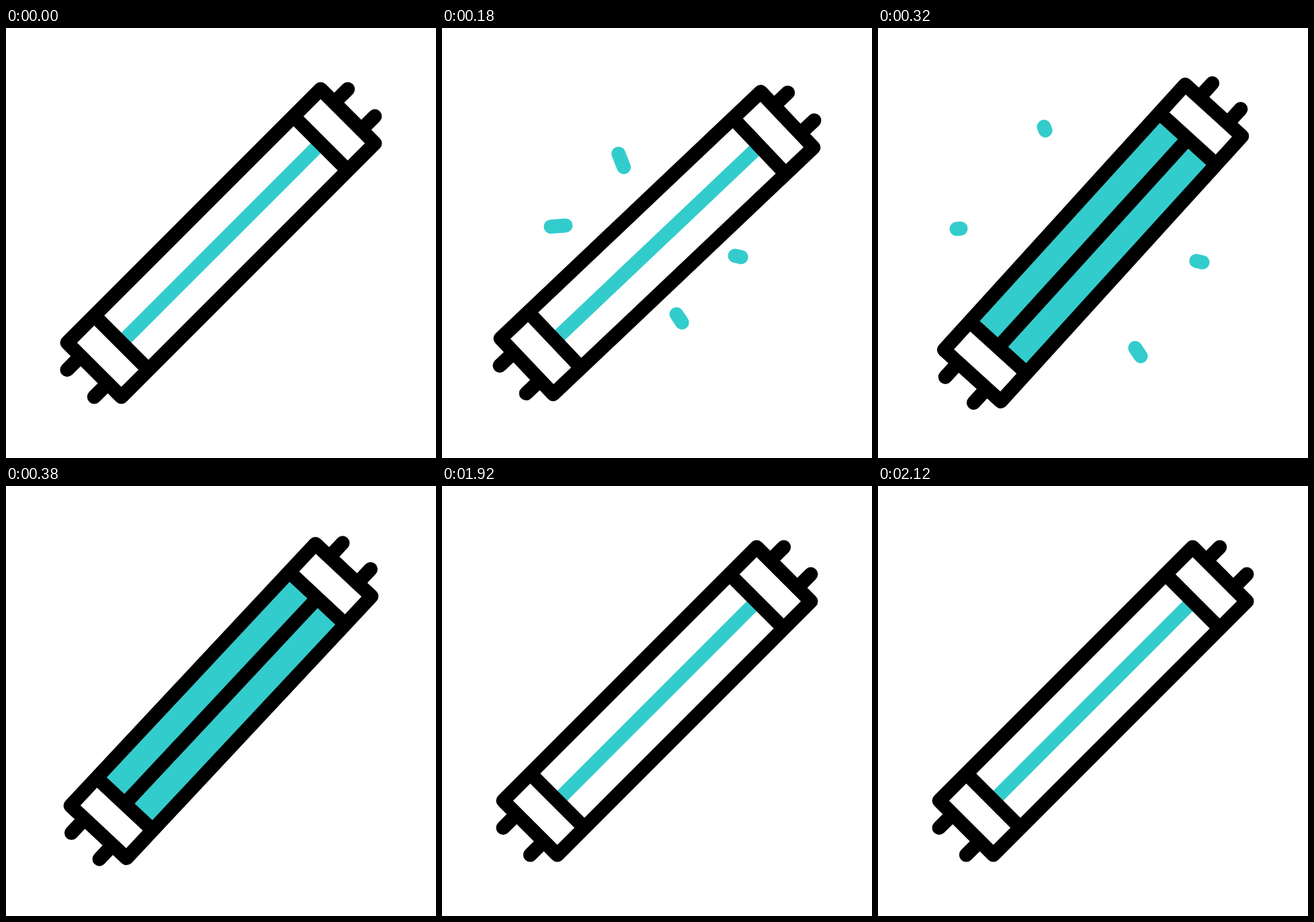
Recreate the animation shown at these times as an HTML page. Size 640 by 640 pixels, loop 3600 ms.

```html
<!DOCTYPE html>
<html lang="en">
<head>
<meta charset="utf-8">
<title>Tube light</title>
<style>
  html, body { margin: 0; width: 100%; height: 100%; overflow: hidden; background: #fff; }
  svg { display: block; width: 100%; height: 100%; }
</style>
</head>
<body>
<svg viewBox="0 0 640 640" fill="none" stroke="#000" stroke-width="21" stroke-linecap="round" stroke-linejoin="round">
  <g id="rays" stroke="#3cc"></g>
  <g id="tube">
    <path fill="#fff" stroke="none" d="M468.3 91 549 171.7 171.7 549 91 468.3Z"/>
    <path id="glass" stroke="none" d="M428 131.3 508.7 212 212 508.7 131.3 428Z"/>
    <path id="core" stroke-linecap="butt" d="M468.3 171.7 171.7 468.3"/>
    <path stroke-linecap="butt" d="M428 131.3 508.7 212M131.3 428 212 508.7"/>
    <path d="M468.3 91 549 171.7 171.7 549 91 468.3Z
      M488.5 111.2 508.7 91M528.8 151.5 549 131.3M111.2 488.5 91 508.7M151.5 528.8 131.3 549"/>
  </g>
</svg>
<script>
const LOOP = 3600, STEP = 20, GROW = 130, LAG = 84;
const TEAL = '#3cc';
const $ = id => document.getElementById(id);
const tube = $('tube'), glass = $('glass'), core = $('core');

// Swing of the tube: time, degrees
const swing = [[20, 0], [120, 4], [270, -3], [540, 0]];
// Spans in which the light is on
const lit = [[220, 1920], [1960, 2020], [2060, 2120]];
// Rays: inner end, outer end, start time
const rays = [
  [270.5, 207, 247, 147, 130],
  [184, 294, 117, 299, 130],
  [436, 339, 483, 348.7, 143],
  [349, 426, 391, 488.5, 143]
].map(ray => {
  const el = document.createElementNS('http://www.w3.org/2000/svg', 'path');
  $('rays').append(el);
  return { ray, el };
});

function ease(t, from, to) {
  const x = Math.min(1, Math.max(0, (t - from) / (to - from)));
  return x * x * (3 - 2 * x);
}

function angle(t) {
  let a = 0;
  for (let i = 1; i < swing.length; i++) {
    const [t0, a0] = swing[i - 1], [t1, a1] = swing[i];
    a += (a1 - a0) * ease(t, t0, t1);
  }
  return a;
}

function draw(t) {
  tube.setAttribute('transform', `rotate(${angle(t)} 320 320)`);
  const on = lit.some(([a, b]) => t >= a && t < b);
  glass.setAttribute('fill', on ? TEAL : '#fff');
  core.setAttribute('stroke', on ? '#000' : TEAL);

  for (const { ray: [x0, y0, x1, y1, start], el } of rays) {
    const head = ease(t, start, start + GROW);
    const tail = ease(t, start + LAG, start + LAG + GROW);
    const at = k => `${x0 + (x1 - x0) * k} ${y0 + (y1 - y0) * k}`;
    el.setAttribute('d', head > tail ? `M${at(tail)}L${at(head)}` : '');
  }
}

const begin = performance.now();
function tick() {
  const t = (performance.now() - begin) % LOOP;
  draw(Math.floor(t / STEP) * STEP);
  requestAnimationFrame(tick);
}
tick();
</script>
</body>
</html>
```
